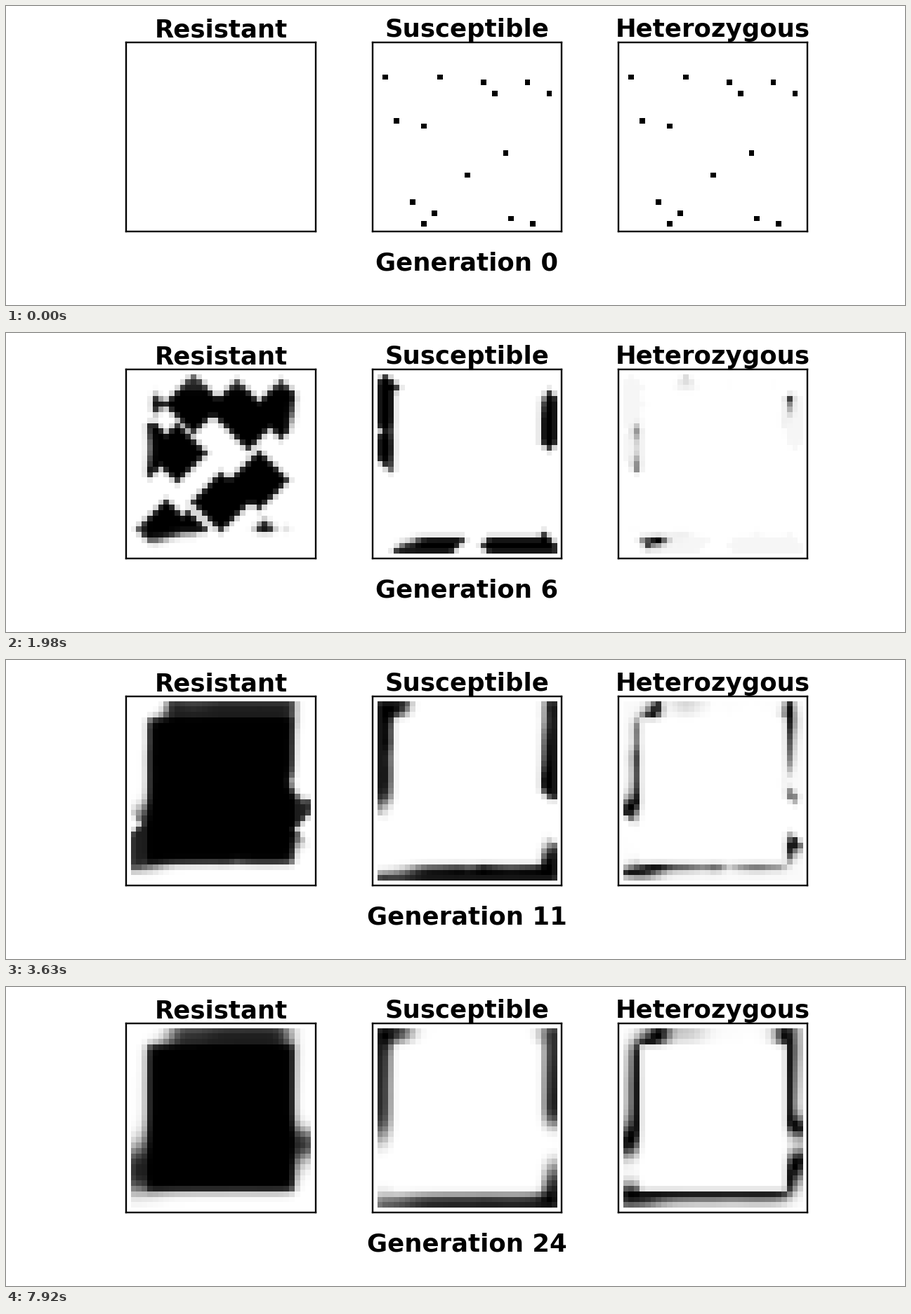
Recreate the animation shown at these times as a matplotlib script. Size 1280 px wide and 427 px high, loop 8 s.

```python
import matplotlib.pyplot as plt
import numpy as np
from matplotlib.animation import FuncAnimation

WIDTH, HEIGHT, DPI = 1280, 427, 64
LOOP, TICK, GEN_TIME = 8000, 40, 330      # milliseconds
GENERATIONS = 25

# Habitat: a treated field inside an untreated refuge three cells wide
SIZE = 35
FIELD = np.zeros((SIZE, SIZE), bool)
FIELD[4:31, 4:31] = True
LIVABLE = np.zeros((SIZE, SIZE))
LIVABLE[1:-1, 1:-1] = 1

GROWTH = 100          # offspring per individual below capacity
SPREAD = 0.08         # share moving to each of the four neighbours
FOUNDERS = 0.1
HET_SHARE = 0.02
# Survival of resistant, susceptible and heterozygous individuals
SURVIVAL = np.array([np.where(FIELD, treated, untreated) for treated, untreated
                     in [(1, 0.88), (0, 1), (0.05, 0.94)]])
SEEDS = [(2, 6), (12, 6), (20, 7), (28, 7), (22, 9), (32, 9), (4, 14), (9, 15),
         (24, 20), (17, 24), (7, 29), (11, 31), (25, 32), (9, 33), (29, 33)]


def disperse(pop):
    out = pop * (1 - 4 * SPREAD)
    for axis in (1, 2):
        for step in (-1, 1):
            out = out + SPREAD * np.roll(pop, step, axis)
    return out * LIVABLE


def reproduce(pop):
    """Random mating within each cell, growth limited by capacity."""
    rr, ss, rs = pop
    total = rr + ss + rs
    r = (rr + rs / 2) / np.where(total > 0, total, 1)
    born = np.minimum(LIVABLE, GROWTH * total)
    return born * np.array([r * r, (1 - r) ** 2, 2 * r * (1 - r)])


def simulate():
    pop = np.zeros((3, SIZE, SIZE))
    for col, row in SEEDS:
        pop[1:, row, col] = FOUNDERS * (1 - HET_SHARE), FOUNDERS * HET_SHARE
    history = [pop, disperse(pop)]
    while len(history) < GENERATIONS:
        history.append(disperse(reproduce(history[-1]) * SURVIVAL))
    return history


def scaled(grid):
    top = grid.max()
    return grid / top if top > 0 else grid


history = [[scaled(grid) for grid in pop] for pop in simulate()]

plt.rcParams.update({"font.family": "DejaVu Sans", "font.weight": "bold",
                     "font.size": 40, "axes.linewidth": 2.67})
fig = plt.figure(figsize=(WIDTH / DPI, HEIGHT / DPI), dpi=DPI, facecolor="white")

BOX, TOP, CELL = 269.5, 52.4, 7.76
view = BOX / CELL / 2                     # half the visible width, in cells
mid = (SIZE - 1) / 2
images = []
for i, name in enumerate(["Resistant", "Susceptible", "Heterozygous"]):
    left = 306.2 + 350.1 * i - BOX / 2
    ax = fig.add_axes([left / WIDTH, 1 - (TOP + BOX) / HEIGHT,
                       BOX / WIDTH, BOX / HEIGHT])
    ax.set_title(name, fontsize=40, fontweight="bold", pad=9.4)
    images.append(ax.imshow(history[0][i], cmap="gray_r", vmin=0, vmax=1,
                            interpolation="nearest", aspect="auto"))
    ax.set(xticks=[], yticks=[], xlim=(mid - view, mid + view),
           ylim=(mid + view, mid - view))
label = fig.text(656 / WIDTH, 50 / HEIGHT, "", ha="center", va="baseline")


def update(frame):
    gen = (frame * TICK + TICK - 1) // GEN_TIME
    for image, grid in zip(images, history[gen]):
        image.set_data(grid)
    label.set_text(f"Generation {gen}")
    return [*images, label]


anim = FuncAnimation(fig, update, frames=LOOP // TICK, interval=TICK,
                     repeat=True, blit=False)
plt.show()
```
